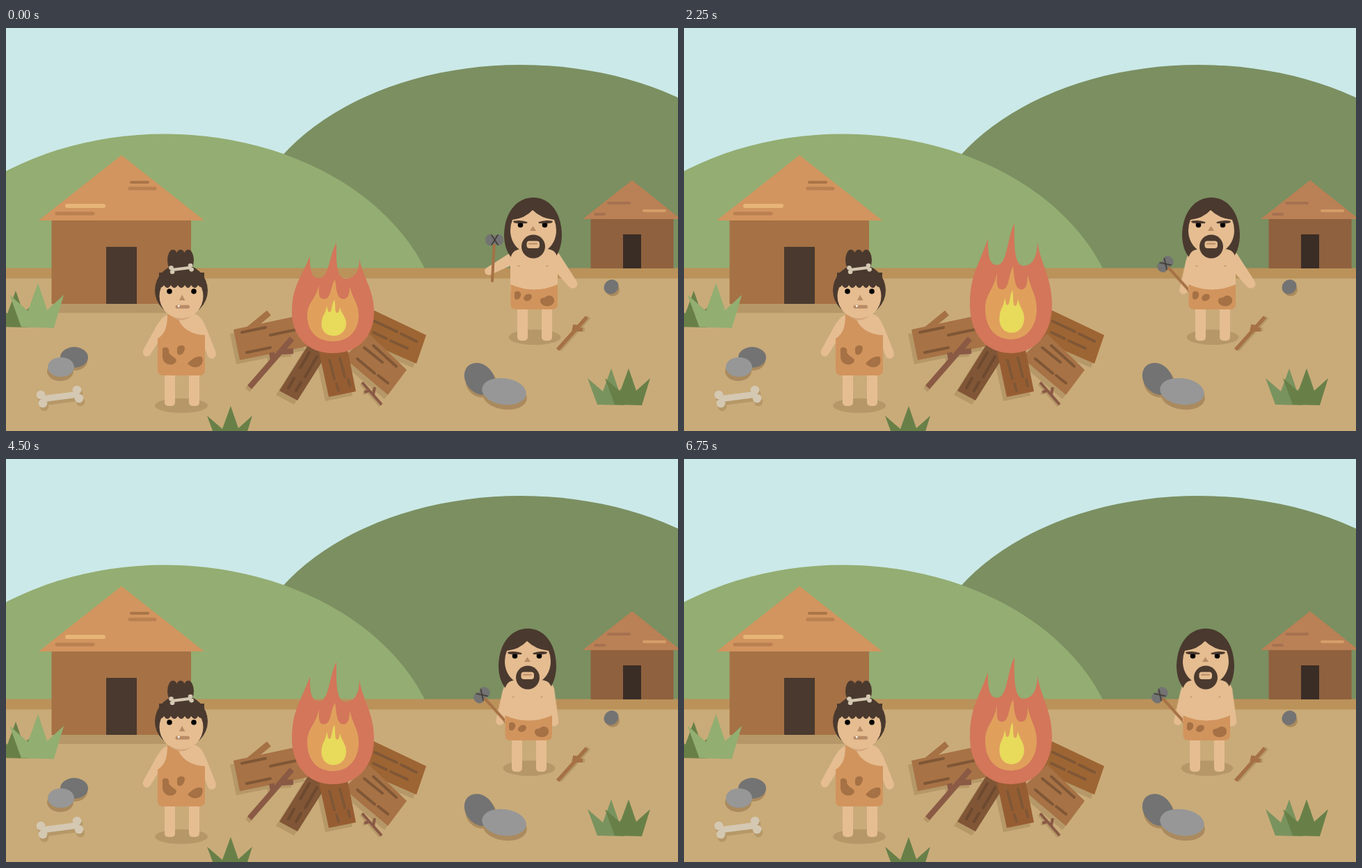
These frames come from a looping animation (966 px wide and 580 px high, 7000 ms). An HTML page:

```html
<!DOCTYPE html>
<html lang="en">
<head>
<meta charset="utf-8">
<title>Stone age camp</title>
<style>
html, body { margin: 0; height: 100%; overflow: hidden; background: #cbe9e8; }
svg { display: block; width: 100vw; height: 100vh; }
.ln { fill: none; stroke-linecap: round; stroke-linejoin: round; }
.butt { stroke-linecap: butt; }
.skin { fill: #e5bd91; }
.hair { fill: #4a392e; }
.hide { fill: #d2945d; }
.spot { fill: #a57145; }
.shade { fill: #b69868; }
.move { animation: 7s -2ms infinite; }

#flame { transform-origin: 470px 468px; animation-name: burn; }
#axeArm { transform-origin: 739px 334.6px; animation-name: lower; }
#freeArm { transform-origin: 783px 330px; animation-name: drop; }
#man { animation-name: walk; }
#ask { opacity: 0; animation-name: wonder; }
#open { animation-name: blink; }
#shut { opacity: 0; animation-name: shut; }

/* one step per 250 ms */
@keyframes burn {
  0% { transform: scaleY(1); animation-timing-function: steps(3); }
  10.714% { transform: scaleY(1.138); animation-timing-function: steps(6); }
  32.143% { transform: scaleY(1.176); animation-timing-function: steps(4); }
  46.429% { transform: scaleY(1.17); animation-timing-function: steps(5); }
  64.286% { transform: scaleY(1.107); animation-timing-function: steps(4); }
  78.571% { transform: scaleY(1.075); animation-timing-function: steps(5); }
  96.429%, 100% { transform: scaleY(1.151); animation-timing-function: steps(1); }
}
@keyframes lower {
  0% { transform: rotate(0); animation-timing-function: steps(3); }
  10.714% { transform: rotate(-35deg); animation-timing-function: steps(1); }
  14.286%, 100% { transform: rotate(-45deg); }
}
@keyframes walk {
  0%, 42.857% { transform: translateX(0); animation-timing-function: steps(4); }
  57.143%, 100% { transform: translateX(-8px); }
}
@keyframes drop {
  0%, 46.429% { transform: rotate(0); animation-timing-function: steps(3); }
  57.143%, 100% { transform: rotate(25deg); }
}
@keyframes wonder {
  0%, 71.429% { opacity: 0; animation-timing-function: steps(2); }
  78.571% { opacity: .9; animation-timing-function: steps(3); }
  89.286%, 100% { opacity: 0; }
}
@keyframes blink {
  0% { opacity: 1; animation-timing-function: step-end; }
  10.714% { opacity: 0; animation-timing-function: step-end; }
  14.286%, 100% { opacity: 1; }
}
@keyframes shut {
  0% { opacity: 0; animation-timing-function: step-end; }
  10.714% { opacity: 1; animation-timing-function: step-end; }
  14.286%, 100% { opacity: 0; }
}
</style>
</head>
<body>
<svg viewBox="0 0 966 580" preserveAspectRatio="none">
  <defs>
    <path id="tuft" d="M-20 52L-34 14L-12 33L0 0L11 32L31 14L19 53Z"/>
    <g id="bone">
      <path class="ln butt" stroke="currentColor" stroke-width="9" d="M51 534L105 527"/>
      <g fill="currentColor">
        <circle cx="50" cy="528" r="6.300"/><circle cx="53" cy="540" r="6.300"/>
        <circle cx="102" cy="521" r="6.300"/><circle cx="105" cy="533" r="6.300"/>
      </g>
    </g>
    <g id="logs">
      <path d="M327 434L425 413L434 458L336 478Z"/>
      <path d="M437 452L393 522L419 536L462 468Z"/>
      <path d="M524 404L604 442L590 483L505 446Z"/>
      <path d="M522 440L576 492L549 528L485 474Z"/>
      <path d="M450 466L490 458L503 523L464 531Z"/>
    </g>
    <path id="stick" class="ln butt" d="M350 517L411 447M384 479L382 467M396 466L413 465"/>
    <path id="twig" class="ln butt" d="M512 510L540 542M522 522L515 524M528 528L530 517"/>
    <path id="club" class="ln butt" d="M793 463L835 416M816 436L818 427M820 434L829 434"/>
  </defs>

  <rect width="966" height="580" fill="#cbe9e8"/>
  <ellipse cx="740" cy="322.500" rx="400" ry="269.500" fill="#7b8f61"/>
  <ellipse cx="228" cy="452.500" rx="400" ry="300" fill="#94ad72"/>
  <rect y="345.500" width="966" height="235" fill="#bb925a"/>
  <rect y="360.500" width="966" height="220" fill="#c9ab79"/>

  <!-- huts -->
  <path class="shade" d="M66 397H266V410H76Z"/>
  <path fill="#a57145" d="M65.500 276H266V397H65.500Z"/>
  <path fill="#4a392e" d="M144 315H188V397H144Z"/>
  <path fill="#d2955f" d="M47 277L166 183L285 277Z"/>
  <g class="ln" stroke-width="5">
    <path stroke="#a97448" stroke-width="4" d="M180 222H204"/>
    <path stroke="#ba8051" d="M178 231H214M73 267H125"/>
    <path stroke="#e7b578" stroke-width="6" d="M88 256H140"/>
  </g>
  <path fill="#8f613e" d="M840.500 274H959.500V346H840.500Z"/>
  <path fill="#3a2d26" d="M887 297H913V346H887Z"/>
  <path fill="#b98155" d="M829 275L900 219L970 275Z"/>
  <g class="ln" stroke-width="4">
    <path stroke="#a67150" d="M866 252H896M847 268H860"/>
    <path stroke="#d59d68" d="M917 263H947"/>
  </g>

  <!-- grass -->
  <use href="#tuft" transform="translate(14 378)" fill="#688048"/>
  <use href="#tuft" transform="translate(46 367) scale(1.2 1.22)" fill="#93ae71"/>
  <use href="#tuft" transform="translate(870 490)" fill="#79935f"/>
  <use href="#tuft" transform="translate(895 490)" fill="#688048"/>
  <use href="#tuft" transform="translate(323 544)" fill="#688048"/>

  <!-- stones and bone -->
  <g fill="#aa8a5e">
    <ellipse cx="98" cy="479" rx="19" ry="14"/><ellipse cx="78" cy="494" rx="19" ry="14"/>
    <ellipse cx="683" cy="510" rx="23" ry="21" transform="rotate(35 683 510)"/>
    <ellipse cx="717" cy="530" rx="32" ry="19" transform="rotate(8 717 530)"/>
    <ellipse cx="872" cy="377" rx="10" ry="9"/>
  </g>
  <g fill="#737373">
    <ellipse cx="98" cy="474" rx="20" ry="15"/>
    <ellipse cx="681" cy="505" rx="25" ry="20" transform="rotate(50 681 505)"/>
    <ellipse cx="870" cy="372.500" rx="11" ry="10" transform="rotate(-45 870 372.500)"/>
  </g>
  <g fill="#979797">
    <ellipse cx="79" cy="488" rx="19" ry="14"/>
    <ellipse cx="716" cy="523" rx="32" ry="19" transform="rotate(8 716 523)"/>
  </g>
  <use href="#bone" color="#b69868" x="2" y="5"/>
  <use href="#bone" color="#d4c8b2"/>

  <!-- campfire -->
  <use href="#logs" class="shade" x="-5" y="6"/>
  <g stroke="#b69868">
    <use href="#stick" stroke-width="8" x="-3" y="4"/>
    <use href="#twig" stroke-width="4" x="-2" y="2"/>
    <use href="#club" stroke-width="6" x="3" y="0"/>
  </g>
  <path class="ln butt" stroke="#a57145" stroke-width="9" d="M350 433L378 410"/>
  <path fill="#a77245" d="M327 434L425 413L434 458L336 478Z"/>
  <path fill="#805636" d="M437 452L393 522L419 536L462 468Z"/>
  <path fill="#9d6533" d="M524 404L604 442L590 483L505 446Z"/>
  <path fill="#a77245" d="M522 440L576 492L549 528L485 474Z"/>
  <path fill="#975d32" d="M450 466L490 458L503 523L464 531Z"/>
  <g class="ln" stroke="#7f5736" stroke-width="4">
    <path d="M339 438L373 431M380 442L418 434M346 467L380 460"/>
    <path d="M530 422L562 437M528 438L547 447M553 450L577 461M568 440L590 451"/>
    <path d="M515 460L541 481M528 457L561 487M505 476L530 497M535 500L549 511"/>
    <path d="M465 478L472 505M480 475L487 502M475 512L478 522M492 506L494 515"/>
    <path stroke="#6d492f" d="M436 467L423 489M447 473L430 502M414 504L406 518M424 510L417 522"/>
  </g>
  <use href="#stick" stroke="#8a5a45" stroke-width="8"/>
  <use href="#twig" stroke="#8a5a45" stroke-width="4"/>
  <use href="#club" stroke="#a57145" stroke-width="5.500"/>
  <g id="flame" class="move">
    <path fill="#d3765a" d="M470 468C432 468 411 442 411 409C411 372 424 360 437 328C437 344 437 360 450 360C465 360 464 328 475 309C475 328 473 361 488 361C501 361 508 350 508 332C513 360 529 375 529 409C529 442 508 468 470 468Z"/>
    <path fill="#e0a05c" d="M470 451C445 451 433 434 433 414C433 394 446 391 450 369C450 379 448 390 457 390C468 390 466 372 473 362C475 374 475 390 485 390C493 390 494 380 494 371C498 390 507 396 507 414C507 434 494 451 470 451Z"/>
    <path fill="#e8da5b" d="M471 443C459 443 453 434 453.500 425C454 413 460 412 461 400C463 405 462 409 465 409C469 409 468 397 472 391C474 397 472 410 476 410C479 410 479 406 480 402C482 411 489 416 489 425C489 435 482 443 471 443Z"/>
  </g>

  <!-- woman -->
  <ellipse class="shade" cx="252" cy="543.500" rx="38" ry="10.500"/>
  <g class="skin">
    <rect x="228" y="490" width="15" height="54" rx="5"/>
    <rect x="263" y="490" width="15" height="54" rx="5"/>
    <path d="M237 411C224 416 218 425 213 435L197 464C195 471 203 477 208 469L225 442Z"/>
    <path d="M268 411C280 415 285 424 288 432L301 465C305 474 294 480 290 472L278 440Z"/>
    <path d="M218 450V428Q225 411 242 411H268Q286 414 286 438V450Z"/>
  </g>
  <path class="hide" d="M232 412H246C249 430 264 441 286 442V492Q286 500 278 500H226Q218 500 218 492V447C229 440 232 430 232 412Z"/>
  <g class="spot">
    <path d="M225 461C230 457 236 461 234 467C238 474 248 475 244 481C238 488 226 484 225 474Z"/>
    <path d="M246 461C247 456 257 455 257 461C256 470 249 473 246 468Z"/>
    <path d="M261 483C266 476 278 470 282 474C286 488 270 493 261 483Z"/>
  </g>
  <path fill="#d3a77b" d="M235 412Q252 429 269 412Z"/>
  <g class="hair">
    <ellipse cx="240" cy="334" rx="8" ry="15"/><ellipse cx="251" cy="334" rx="8" ry="15"/>
    <ellipse cx="262" cy="334" rx="8" ry="15"/>
    <ellipse cx="252" cy="377.500" rx="38" ry="37.500"/>
  </g>
  <ellipse class="skin" cx="252" cy="386" rx="31.500" ry="32"/>
  <path class="hair" d="M220 371V352H285V371Q280 376 276 370Q272 378 266 370Q262 378 257 370Q252 378 247 370Q242 378 237 370Q232 378 227 370Q224 376 220 371Z"/>
  <use href="#bone" color="#d4c8b2" transform="translate(211 88) scale(.53 .487)"/>
  <g id="open" class="move"><circle cx="235" cy="379" r="3.800"/><circle cx="270" cy="379" r="3.800"/></g>
  <path id="shut" class="ln move" stroke="#30251f" stroke-width="1.300" d="M232 380.500Q235 382.500 238.500 380.500M267 380.500Q270 382.500 273.500 380.500"/>
  <path fill="#b68d66" d="M253 384L257.500 392H249Z"/>
  <path class="ln" stroke="#b98b66" stroke-width="5" d="M246 401.300H261.500"/>
  <path fill="#fff" d="M246.500 399H250L248.300 402.500Z"/>

  <!-- man -->
  <g id="man" class="move">
    <ellipse class="shade" cx="760" cy="445" rx="37.500" ry="11"/>
    <g class="skin">
      <rect x="735" y="395" width="15" height="55" rx="5"/>
      <rect x="770" y="395" width="15" height="55" rx="5"/>
    </g>
    <g id="axeArm" class="move">
      <path class="skin" d="M742 318Q732 318 724 324L691 345C684 350 691 359 699 354L732 339L742 346Z"/>
      <path class="ln" stroke="#a57145" stroke-width="4" d="M699 364L702 305"/>
      <g fill="#737373">
        <ellipse cx="696" cy="305" rx="7" ry="8"/><ellipse cx="708" cy="305" rx="7" ry="8"/>
        <rect x="696" y="299" width="12" height="12"/>
      </g>
      <path class="ln" stroke="#3f3832" stroke-width="1.500" d="M698 298L707 312M707 298L698 312"/>
    </g>
    <path id="freeArm" class="skin move" d="M776 318Q792 318 797 328L820 364C825 371 816 379 809 372L785 345L776 341Z"/>
    <path class="hair" d="M727 331C719 322 716 310 716 297C717 264 735 244 758 244S798 264 799 297C799 310 796 322 789 331Z"/>
    <path class="skin" d="M725 378V336Q725 318 743 318H776Q793 318 793 336V378Z"/>
    <path class="hide" d="M725.500 369Q759 384 793 369V397Q793 405 785 405H733Q725.500 405 725.500 397Z"/>
    <g class="spot">
      <path d="M731 381C734 376 742 380 740 385C739 392 730 393 731 386Z"/>
      <path d="M744 390C744 384 751 381 755 384C759 390 748 397 744 390Z"/>
      <path d="M768 393C768 386 774 390 777 386C784 383 789 388 788 394C785 403 769 402 768 393Z"/>
    </g>
    <g fill="#cfa276"><circle cx="737" cy="342.500" r="1.500"/><circle cx="778" cy="342.500" r="1.500"/></g>
    <path class="skin" d="M728 276Q746 274 757 262Q769 274 788 276Q791 283 791 291C791 311 777 325 758 325S725 311 725 291Q725 283 728 276Z"/>
    <g class="hair">
      <path d="M729 278Q741 275 750 280Q740 283 730 280ZM786 278Q774 275 765 280Q775 283 785 280Z"/>
      <circle cx="758" cy="314.500" r="17"/>
    </g>
    <circle cx="739.500" cy="283.500" r="3.800"/><circle cx="774.500" cy="283.500" r="3.800"/>
    <path class="ln" stroke="#4a392e" stroke-width="2.500" d="M731 279L748 280M784 279L767 280"/>
    <path fill="#b68d66" d="M757.500 285L762 292H753Z"/>
    <rect class="skin" x="748.500" y="306.500" width="18.500" height="10.500" rx="4"/>
    <path class="ln" stroke="#b98b66" stroke-width="2" d="M752 310.500H763"/>
  </g>

  <text id="ask" class="move" x="691.500" y="279" text-anchor="middle" font-family="'Open Sans', sans-serif" font-size="21" fill="#6c736c">?</text>
</svg>
</body>
</html>
```
